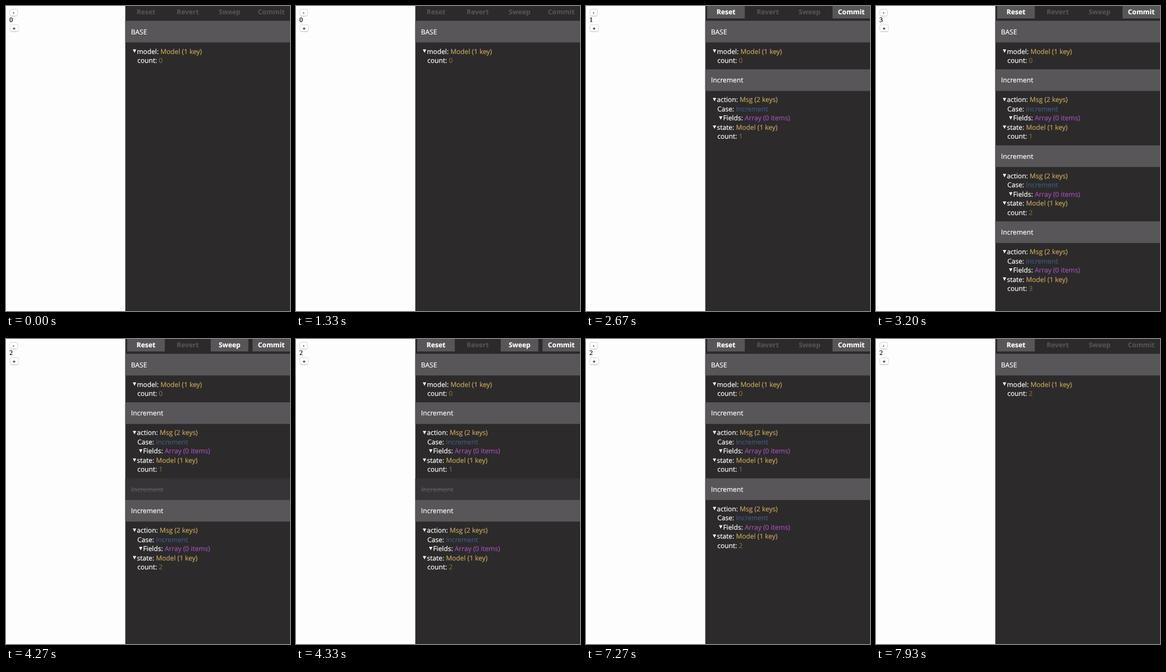
Write an HTML page with a canvas that moves like this. It is 480x515 px and loops after 8 s.

```html
<!DOCTYPE html>
<html lang="en">
<head>
<meta charset="utf-8">
<title>Counter with time-travel debugger</title>
<style>
html, body { margin: 0; width: 100%; height: 100%; overflow: hidden; background: #2c2a2b; }
canvas { display: block; }
</style>
</head>
<body>
<canvas id="stage" width="480" height="515"></canvas>
<script>
const ctx = document.getElementById('stage').getContext('2d');
const LOOP = 8000, PANEL_X = 201.6, HEADER_H = 36.5, ROW_H = 15.47;
const SANS = '"Open Sans", sans-serif';
const COLOR = {
  panel: '#2c2a2b', header: '#585658', skipped: '#363436',
  label: '#ffffff', muted: '#5c5a5c',
  object: '#c3a45c', array: '#a04fb4', string: '#3f5a84', number: '#866a3c'
};

// Unhinted glyphs keep their true height at fractional sizes.
ctx.textRendering = 'geometricPrecision';

// Each step replaces the debugger state from its time onward.
const steps = [
  { at: 0, base: 0, actions: [], reset: false },
  { at: 1800, base: 0, actions: [1] },
  { at: 2700, base: 0, actions: [1, 2] },
  { at: 3100, base: 0, actions: [1, 2, 3] },
  { at: 3870, base: 0, actions: [1, null, 2] },   // null marks a skipped action
  { at: 6330, base: 0, actions: [1, 2] },
  { at: 7330, base: 2, actions: [] }
];

function rect(x, y, w, h, color) {
  ctx.fillStyle = color;
  ctx.fillRect(x, y, w, h);
}

// A hairline stroke gives the text its slightly heavy smoothing.
function text(str, x, y, color, font = '11.4px ' + SANS, align = 'left') {
  ctx.font = font;
  ctx.textAlign = align;
  ctx.fillStyle = ctx.strokeStyle = color;
  ctx.lineWidth = 0.2;
  ctx.fillText(str, x, y);
  ctx.strokeText(str, x, y);
  return ctx.measureText(str).width;
}

function arrow(x, y) {
  ctx.fillStyle = COLOR.label;
  ctx.beginPath();
  ctx.moveTo(x, y);
  ctx.lineTo(x + 5.8, y);
  ctx.lineTo(x + 2.9, y + 5.7);
  ctx.fill();
}

function row(label, value, type, x, y, expandable) {
  if (expandable) arrow(x - 6.9, y - 7.2);
  const width = text(label + ': ', x, y, COLOR.label);
  text(value, x + width, y, COLOR[type]);
}

// Draws one log entry and returns the top of the next one.
function entry(title, rows, y) {
  rect(PANEL_X, y, 480 - PANEL_X, HEADER_H, rows ? COLOR.header : COLOR.skipped);
  const width = text(title, 211.3, y + 22.5, rows ? COLOR.label : COLOR.muted);
  if (!rows) {
    rect(211.3, y + 18.5, width, 1, COLOR.muted);
    return y + HEADER_H;
  }
  rows.forEach(([label, value, type, x, expandable], i) =>
    row(label, value, type, x, y + 55.5 + i * ROW_H, expandable));
  return y + 51 + rows.length * ROW_H;
}

const modelRows = (label, count) => [
  [label, 'Model (1 key)', 'object', 221.2, true],
  ['count', count, 'number', 222, false]
];

const actionRows = count => [
  ['action', 'Msg (2 keys)', 'object', 221.2, true],
  ['Case', 'Increment', 'string', 222, false],
  ['Fields', 'Array (0 items)', 'array', 231.7, true],
  ...modelRows('state', count)
];

function toolbar(enabled) {
  ['Reset', 'Revert', 'Sweep', 'Commit'].forEach((name, i) => {
    const center = 236.6 + i * 70.6;
    if (enabled[name]) rect(center - 31.8, 0, 63.6, 21, COLOR.header);
    text(name, center, 14.2, enabled[name] ? COLOR.label : '#555355', 'bold 11.4px ' + SANS, 'center');
  });
}

function counterButton(label, y, width) {
  ctx.beginPath();
  ctx.roundRect(6.5, y, width, 11.5, 2.5);
  ctx.fillStyle = '#ffffff';
  ctx.fill();
  ctx.strokeStyle = '#d0cfd1';
  ctx.lineWidth = 0.8;
  ctx.stroke();
  rect(8, y + 11.2, width - 3, 0.7, '#bdbcbe');
  text(label, 6.5 + width / 2, y + 8.8, '#000', '8.5px "Liberation Sans", sans-serif', 'center');
}

function draw(time) {
  const { base, actions, reset = true } = steps.findLast(step => step.at <= time);
  const count = actions.length ? actions[actions.length - 1] : base;

  rect(0, 0, 480, 515, '#fefdfe');
  rect(PANEL_X, 0, 480 - PANEL_X, 515, COLOR.panel);

  counterButton('-', 5.5, 13);
  text(count, 5.8, 27.4, '#000', '11.5px "Liberation Serif", serif');
  counterButton('+', 31.7, 14.7);

  toolbar({
    Reset: reset,
    Sweep: actions.includes(null),
    Commit: actions.length > 0
  });
  let y = entry('BASE', modelRows('model', base), 25);
  for (const value of actions) {
    y = entry('Increment', value === null ? null : actionRows(value), y);
  }
}

function frame() {
  draw(performance.now() % LOOP);
  requestAnimationFrame(frame);
}
frame();
</script>
</body>
</html>
```
